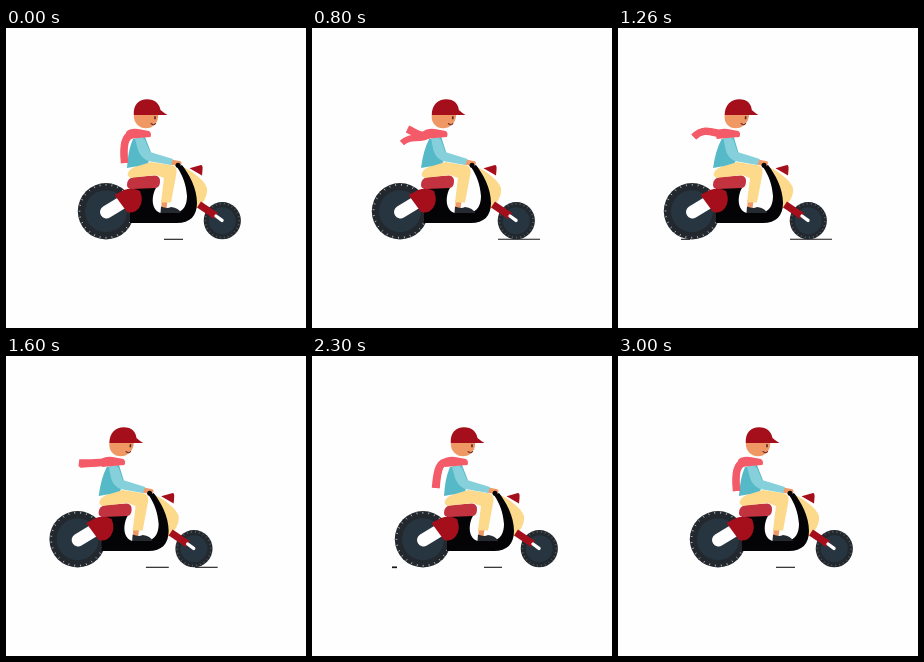
Write an HTML page with a canvas that moves like this. It is 300x300 px and loops after 3.02 s.

```html
<!DOCTYPE html>
<html lang="en">
<head>
<meta charset="utf-8">
<title>Scooter ride</title>
<style>
html, body { margin: 0; width: 100%; height: 100%; overflow: hidden; background: #fefefe; }
canvas { display: block; width: 300px; height: 300px; }
</style>
</head>
<body>
<canvas id="stage" width="300" height="300"></canvas>
<script>
const ctx = document.getElementById('stage').getContext('2d');
const LOOP = 3020, STEP = 20;
const RED = '#a50f1c', BLACK = '#040407', CREAM = '#fcd98b', SKIN = '#ef9864',
      TEAL = '#55b9c7', SKY = '#86d0dc', SCARF = '#f45b69', WHITE = '#fefefe';

// Keys are [time, ...values]
const ride = [[0, 0], [240, -0.8], [480, -4], [800, -12], [1080, -21.5], [1260, -26], [1470, -29.5],
              [1640, -27], [1900, -11.5], [2160, 5], [2300, 11], [2460, 15], [2720, 5], [3000, 0], [3020, 0]];
const lean = [[0, 0], [480, 0.5], [800, 4.5], [1260, 5.5], [1900, 3], [2300, 0], [3020, 0]];
const tailA = [
  [0, 118, 107, 117, 118, 118.5, 135], [480, 116, 105, 113, 116, 111.5, 130],
  [800, 117, 110, 112, 104, 104.5, 101], [1260, 119, 106, 109, 98, 99, 109],
  [1900, 116, 107, 110, 116, 101, 108], [2300, 116, 104, 114, 113, 112.5, 132],
  [3000, 118, 107, 117, 118, 118.5, 135], [3020, 118, 107, 117, 118, 118.5, 135]];
const tailB = [
  [0, 118, 107, 117, 118, 118.5, 135], [480, 119, 106, 118, 118, 118.5, 133],
  [800, 117, 114, 109, 106, 100, 115], [1260, 119, 106, 109, 98, 99, 109],
  [1900, 116, 109, 110, 117, 103, 112], [2300, 117, 104, 115, 113, 113.5, 132],
  [3000, 118, 107, 117, 118, 118.5, 135], [3020, 118, 107, 117, 118, 118.5, 135]];
// Road dashes: time, left, right
const dashes = [
  [[2640, 240, 240], [2800, 206, 238], [3000, 158, 177], [3020, 158, 177], [3500, 90, 96], [3640, 60, 62]],
  [[560, 240, 240], [800, 198, 240], [1260, 89, 98], [1400, 60, 62]],
  [[1080, 240, 240], [1260, 198, 240], [1900, 142, 148], [2200, 70, 74]],
  [[1480, 240, 240], [1640, 210, 240], [1900, 154, 190], [2300, 69, 74], [2400, 50, 51]],
  [[1800, 240, 240], [1900, 218, 240], [2300, 161, 179], [2660, 50, 53]]];

function sample(keys, t, smooth) {
  const last = keys.length - 1;
  let i = 0;
  while (i < last - 1 && t >= keys[i + 1][0]) i++;
  const a = keys[i], b = keys[i + 1], p = keys[Math.max(0, i - 1)], n = keys[Math.min(last, i + 2)];
  const span = b[0] - a[0], u = (t - a[0]) / span;
  return a.slice(1).map((v, k) => {
    const w = b[k + 1];
    if (!smooth) return v + (w - v) * u;
    const m0 = i ? (w - p[k + 1]) / (b[0] - p[0]) * span : 0;
    const m1 = i + 1 < last ? (n[k + 1] - v) / (n[0] - a[0]) * span : 0;
    const u2 = u * u, u3 = u2 * u;
    return v * (2 * u3 - 3 * u2 + 1) + m0 * (u3 - 2 * u2 + u) + w * (3 * u2 - 2 * u3) + m1 * (u3 - u2);
  });
}

function fill(color, d) {
  ctx.fillStyle = color;
  ctx.fill(new Path2D(d));
}

function line(color, width, d, cap = 'butt') {
  ctx.strokeStyle = color;
  ctx.lineWidth = width;
  ctx.lineCap = cap;
  ctx.lineJoin = 'round';
  ctx.stroke(new Path2D(d));
}

function disc(color, x, y, r) {
  ctx.fillStyle = color;
  ctx.beginPath();
  ctx.arc(x, y, r, 0, Math.PI * 2);
  ctx.fill();
}

function wheel(x, y, r, hub, ticks, angle, mark) {
  disc('#22282d', x, y, r);
  disc('#263540', x, y, hub);
  ctx.strokeStyle = mark;
  ctx.lineWidth = 0.9;
  ctx.lineCap = 'butt';
  for (let i = 0; i < ticks; i++) {
    const a = angle + i * Math.PI * 2 / ticks, c = Math.cos(a), s = Math.sin(a);
    ctx.beginPath();
    ctx.moveTo(x + c * (r - 2.6), y + s * (r - 2.6));
    ctx.lineTo(x + c * (r - 0.8), y + s * (r - 0.8));
    ctx.stroke();
  }
}

function road(t) {
  for (const keys of dashes) {
    for (const at of [t, t + LOOP]) {
      if (at < keys[0][0] || at > keys[keys.length - 1][0]) continue;
      const [l, r] = sample(keys, at);
      if (r - l > 0.2) line('#17171a', r - l < 7 ? 1.7 : 1.1, `M${l} 211.3H${r}`);
    }
  }
}

function scooter(t) {
  const turn = t / LOOP * Math.PI * 2;
  wheel(100, 183.2, 28.2, 21, 28, turn * 3, '#b9bec0');
  wheel(216.3, 192.7, 18.6, 13.5, 26, turn * 5, '#59636a');
  fill(CREAM, 'M175 138C184 142 198 151 201 160C202 168 197 176 190 181C191 166 185 150 175 138Z');
  fill(BLACK, 'M124 160H150C145 168 145 184 156 185H169C178 184 181 176 181 168C180 156 177 148 171 139' +
    'L176 137C183 146 191 160 191 175C191 188 184 195 171 195H124Z');
  line(WHITE, 13, 'M100.5 184L117 174', 'round');
  fill(RED, 'M108.5 167L118 162Q127 159 134 163Q138 173 133 180Q128 186 121 184Z');
  fill('#c2323f', 'M121 157Q121 150 128 149L149 147.5Q154 148 154 153Q154 159 150 160L126 161Q121 161 121 157Z');
  fill(RED, 'M183.5 140.2L195 137Q197 137 196.5 142L196 147.5Z');
  line(RED, 7, 'M193 176.5L210 188');
  line(WHITE, 3.4, 'M210 188L216 192.4', 'round');
}

function scarfTail(keys, t, width) {
  const [a, b, c, d, x, y] = sample(keys, t, true);
  line(SCARF, width, `M128 106C${a} ${b} ${c} ${d} ${x} ${y}`);
}

function rider(t) {
  fill(SKIN, 'M155.5 172H161.5L160.5 181H155.5Z');
  fill('#242a30', 'M155 178.5Q161 181 165 179Q173 180 175 185H154.5Z');
  fill(CREAM, 'M121.5 147Q122 141 131 138L145 134L164 137Q171 137 170.5 145L165 174.5H155L158 150L150 147L124 150Z');

  ctx.save();
  const l = sample(lean, t, true)[0];
  ctx.transform(1, 0, -l / 60, 1, l * 140 / 60, 0);
  fill(TEAL, 'M127 111Q122 122 121 140Q131 139 142 135L146 127L139 109Z');
  line(SKIN, 5, 'M166 134.3L173 135.5', 'round');
  fill(SKY, 'M129 111Q135 107 139 112L144 124L167 131L165 137L142 133Q135 130 132 122Z');
  scarfTail(tailB, t, 6.5);
  scarfTail(tailA, t, 7.5);
  fill(SCARF, 'M120 104Q124 100 132 101L143 103Q146 105 144.5 109L133 110L122 111Z');
  disc(SKIN, 140, 88, 12.2);
  fill(RED, 'M127.8 87C127 77 133 71.3 141 71.3C149 71.3 153.5 76 154.5 82Q158 85 161.5 87Z');
  fill('#572522', 'M148.2 88.2H149.8V91.2H148.2Z');
  line('#71302c', 1.1, 'M145 95.5Q148 98 149.5 95.5', 'round');
  ctx.restore();
  disc(BLACK, 172, 137.3, 2.5);
}

function draw(t) {
  ctx.fillStyle = WHITE;
  ctx.fillRect(0, 0, 300, 300);
  ctx.save();
  ctx.translate(sample(ride, t, true)[0], 0);
  road(t);
  scooter(t);
  rider(t);
  ctx.restore();
}

const start = performance.now();
function tick() {
  const t = (performance.now() - start) % LOOP;
  draw(Math.floor(t / STEP) * STEP);
  requestAnimationFrame(tick);
}
tick();
</script>
</body>
</html>
```
